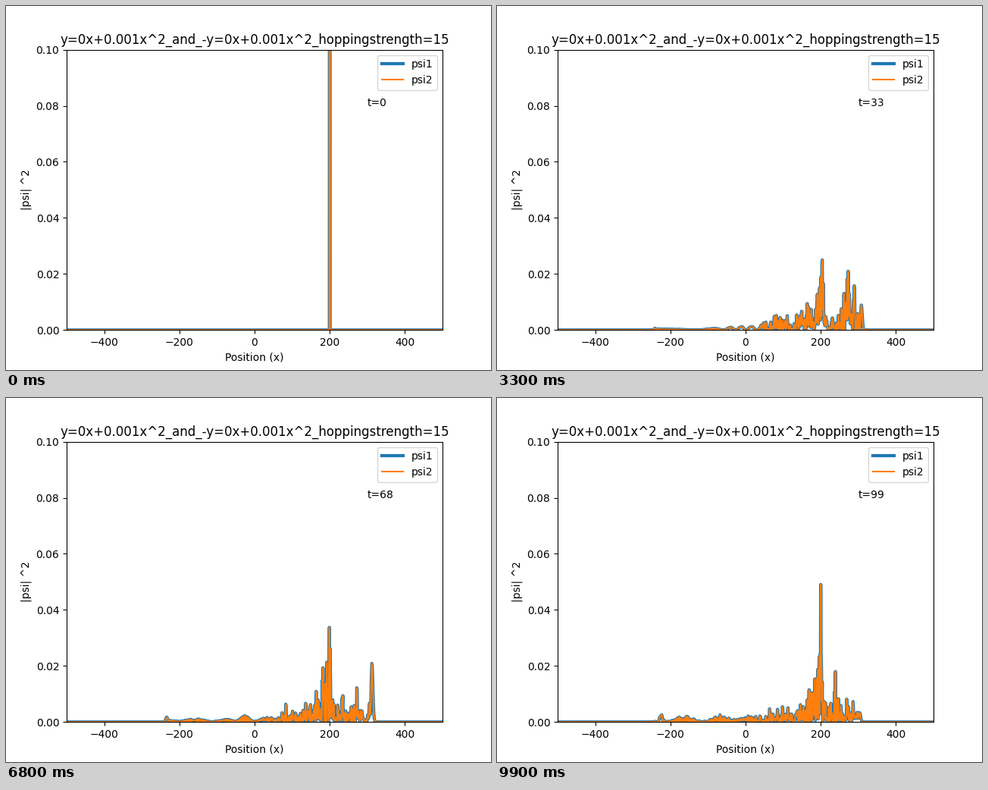
A matplotlib script that plays this animation: 640 by 480 pixels, repeating every 10 s.

```python
import numpy as np
import matplotlib.pyplot as plt
from matplotlib.animation import FuncAnimation

FRAMES = 100
HOP = 15
START = 200

plt.rcParams["font.family"] = "DejaVu Sans"

# Tight-binding chain in a quadratic potential, solved exactly.
x = np.arange(-500, 501)
side = np.full(x.size - 1, float(HOP))
hamiltonian = np.diag(0.001 * x**2) + np.diag(side, 1) + np.diag(side, -1)
energy, modes = np.linalg.eigh(hamiltonian)
weights = modes[START - x[0]]


def density(t):
    """Probability at time t; the sign of the potential does not affect it."""
    return np.abs(modes @ (weights * np.exp(-1j * energy * t))) ** 2


fig, ax = plt.subplots(figsize=(6.4, 4.8), dpi=100)
psi1, = ax.plot(x, density(0), lw=3, label="psi1")
psi2, = ax.plot(x, density(0), lw=1.5, label="psi2")
clock = ax.text(300, 0.08, "t=0")

ax.set_xlim(-500, 500)
ax.set_ylim(0, 0.1)
ax.set_title("y=0x+0.001x^2_and_-y=0x+0.001x^2_hoppingstrength=15")
ax.set_xlabel("Position (x)")
ax.set_ylabel("|psi| ^2")
ax.legend(loc="upper right")


def update(t):
    prob = density(t)
    psi1.set_ydata(prob)
    psi2.set_ydata(prob)
    clock.set_text(f"t={t}")
    return psi1, psi2, clock


anim = FuncAnimation(fig, update, frames=FRAMES, interval=100,
                     repeat=True, repeat_delay=0)
plt.show()
```
